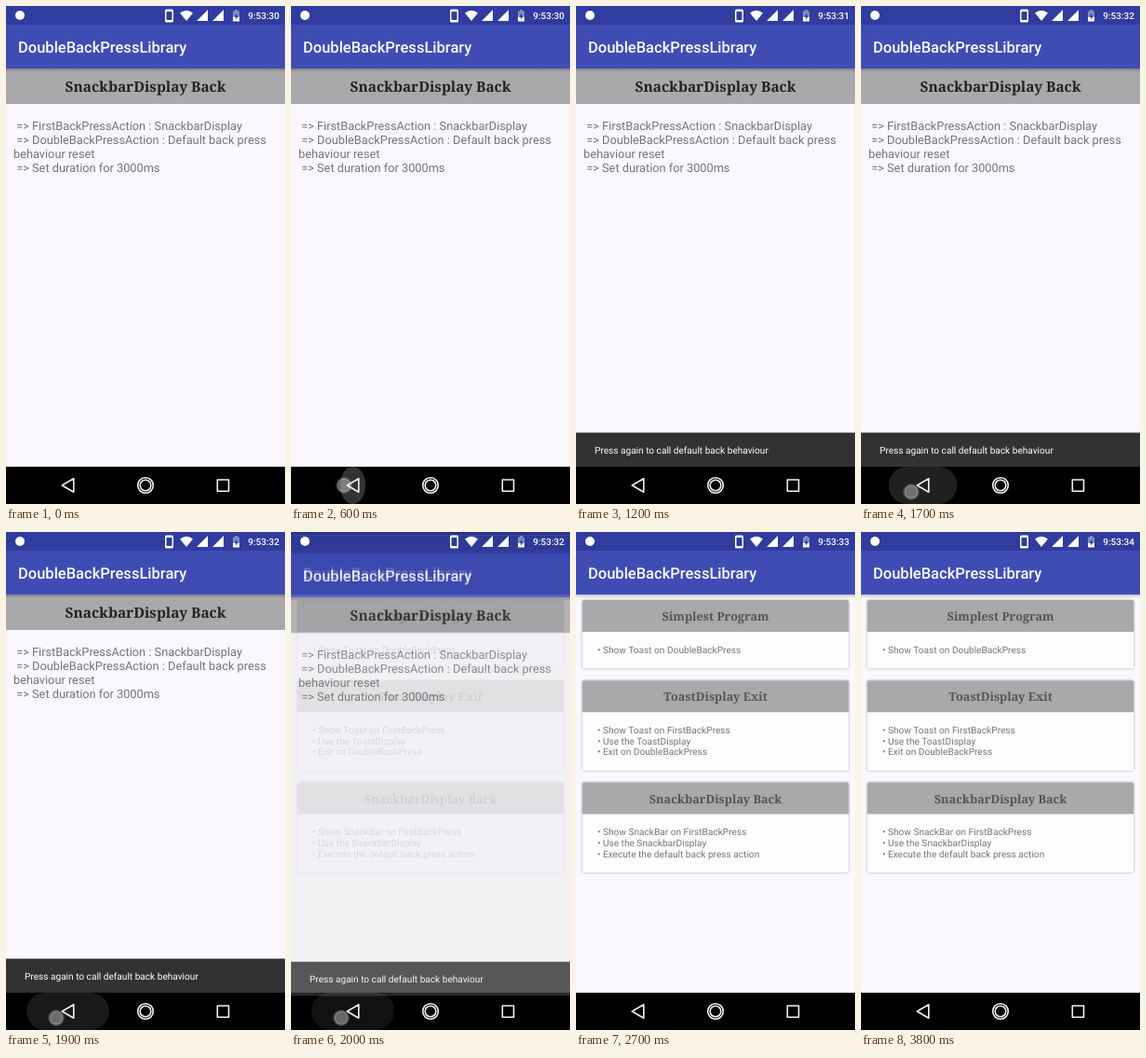
An HTML page that plays this animation: 300 px wide and 534 px high, repeating every 4000 ms.

```html
<!DOCTYPE html>
<html lang="en">
<head>
<meta charset="utf-8">
<title>Double back press demo</title>
<style>
  html, body { margin: 0; width: 100%; height: 100%; overflow: hidden; background: #000; }
  svg { display: block; width: 300px; height: 534px; font-family: Roboto, sans-serif; text-rendering: geometricPrecision; }
  .title { font: 500 16.5px Roboto, sans-serif; fill: #fff; }
  .serif { font-family: "Noto Serif", serif; font-weight: 700; text-anchor: middle; }
  .body { font-size: 12.78px; fill: #757478; }
  .item { font-size: 10.13px; fill: #77767a; }
  .card { filter: drop-shadow(0 .8px 1.2px rgba(0, 0, 0, .34)); }
  .nav { fill: none; stroke: #f2f2f2; stroke-width: 1.6; stroke-linejoin: round; }
</style>
</head>
<body>
<svg viewBox="0 0 300 534">
  <defs>
    <linearGradient id="shade" x2="0" y2="1">
      <stop stop-opacity=".22"/>
      <stop offset="1" stop-opacity="0"/>
    </linearGradient>
    <clipPath id="window"><path d="M0 0h300v494H0z"/></clipPath>
    <g id="appBar">
      <rect y="67" width="300" height="4" fill="url(#shade)"/>
      <rect width="300" height="67" fill="#3f4cb4"/>
      <rect width="300" height="20" fill="#303c9e"/>
      <text class="title" x="13" y="50">DoubleBackPressLibrary</text>
    </g>
  </defs>

  <rect width="300" height="534"/>
  <g id="home">
    <rect width="300" height="494" fill="#faf8fc"/>
    <g id="cards"></g>
    <use href="#appBar"/>
  </g>

  <g id="detail">
    <rect width="300" height="494" fill="#faf8fc"/>
    <rect y="67" width="300" height="38" fill="#a9a8aa"/>
    <text class="serif" x="150" y="92" font-size="15.4" fill="#222">SnackbarDisplay Back</text>
    <g class="body">
      <text x="11.2" y="133">=&gt; FirstBackPressAction : SnackbarDisplay</text>
      <text x="11.2" y="148">=&gt; DoubleBackPressAction : Default back press</text>
      <text x="8" y="163">behaviour reset</text>
      <text x="11.2" y="178">=&gt; Set duration for 3000ms</text>
    </g>
    <use href="#appBar"/>
    <g clip-path="url(#window)">
      <g id="snackbar">
        <rect y="457.5" width="300" height="37" fill="#323134"/>
        <text id="message" x="20" y="479.5" font-size="10.1" fill="#fff">Press again to call default back behaviour</text>
      </g>
    </g>
    <rect y="494" width="300" height="40"/>
  </g>

  <g fill="#fff">
    <circle cx="15" cy="10" r="5"/>
    <path fill-rule="evenodd" d="M172.500 3.500h6q1.500 0 1.500 1.500v11q0 1.500-1.500 1.500h-6q-1.500 0-1.500-1.500v-11q0-1.500 1.500-1.500zM172.500 6v9h6v-9z"/>
    <path d="M187 7.500q7-5.500 14 0l-7 8.500z"/>
    <path d="M217 4v12h-12zM234 4v12h-12z"/>
    <path d="M244 5.500h2v-1.500h3v1.500h2v6h-7z" opacity=".4"/>
    <path d="M244 11.500h7v5h-7z"/>
    <path d="M248.200 7.500l-2.700 4.500h1.700v3l2.600-4.500h-1.600z" fill="#303c9e"/>
    <text id="clock" x="294" y="13.800" text-anchor="end" font-size="10" font-weight="500"></text>
  </g>

  <rect id="ripple" y="494" height="40" rx="20" fill="#fff"/>
  <circle id="finger" r="7.5" fill="#fff" fill-opacity=".36" stroke="#fff" stroke-opacity=".16" stroke-width="3"/>
  <g class="nav">
    <path d="M60.300 514l12.500-7.300v14.600z"/>
    <circle cx="150" cy="514" r="8.300"/>
    <circle cx="150" cy="514" r="5.800"/>
    <path d="M227.300 508h12.200v12.200h-12.200z"/>
  </g>
</svg>

<script>
const LOOP = 4000, STEP = 100;
const $ = id => document.getElementById(id);
const clamp = v => Math.min(1, Math.max(0, v));
const progress = (t, start, duration) => clamp((t - start) / duration);

function setAttrs(id, attrs) {
  for (const name in attrs) $(id).setAttribute(name, attrs[name]);
}

// Material "fast out, slow in": cubic-bezier(.4, 0, .2, 1)
function fastOutSlowIn(x) {
  let lo = 0, hi = 1, u = x;
  for (let i = 0; i < 20; i++) {
    u = (lo + hi) / 2;
    const at = 1.2 * u * (1 - u) ** 2 + .6 * u * u * (1 - u) + u ** 3;
    if (at < x) lo = u; else hi = u;
  }
  return 3 * u * u - 2 * u ** 3;
}

const cards = [
  [73, 'Simplest Program', 'Show Toast on DoubleBackPress'],
  [159.2, 'ToastDisplay Exit', 'Show Toast on FirstBackPress', 'Use the ToastDisplay', 'Exit on DoubleBackPress'],
  [268.5, 'SnackbarDisplay Back', 'Show SnackBar on FirstBackPress', 'Use the SnackbarDisplay', 'Execute the default back press action'],
];
$('cards').innerHTML = cards.map(([y, title, ...items]) => `
  <g class="card">
    <rect x="6.7" y="${y}" width="286.6" height="${62 + 11.6 * items.length}" rx="2" fill="#fdfcfe"/>
    <path d="M6.700 ${y + 34}v-32q0-2 2-2h282.600q2 0 2 2v32z" fill="#a9a8aa"/>
  </g>
  <text class="serif" x="150" y="${y + 22}" font-size="12.7" fill="#555457">${title}</text>
  ${items.map((item, i) => `<text class="item" x="23" y="${y + 56.8 + 11.7 * i}">• ${item}</text>`).join('')}`).join('');

const presses = [
  { down: 560, up: 700, fade: 450, glow: .2, x: 57, y: 514, lift: 700 },
  { down: 1560, up: 1800, fade: 450, glow: .125, x: 54, y: 521, lift: 2000 },
];

function drawPress(t) {
  const p = presses[t < 1500 ? 0 : 1];
  const width = 89 * (1 - (1 - progress(t, p.down, 240)) ** 2);
  setAttrs('ripple', { x: 66.5 - width / 2, width, opacity: p.glow * (1 - progress(t, p.up, p.fade)) });
  setAttrs('finger', { cx: p.x, cy: p.y, opacity: t < p.down ? 0 : 1 - progress(t, p.lift, 200) });
}

function draw(t) {
  $('clock').textContent = '9:53:' + (30 + Math.floor((t + 300) / 1000));

  const slide = fastOutSlowIn(progress(t, 717, 250));
  setAttrs('snackbar', { transform: `translate(0 ${37 * (1 - slide)})` });
  setAttrs('message', { opacity: progress(t, 800, 180) });

  // The closing screen drops by 8% of the height and fades near the end
  const leave = progress(t, 1868, 250);
  setAttrs('detail', {
    transform: `translate(0 ${42.7 * leave ** 4})`,
    opacity: 1 - progress(t, 1966, 150),
  });
  setAttrs('home', { opacity: .7 + .3 * leave });

  drawPress(t);
}

function tick() {
  draw(Math.floor(performance.now() % LOOP / STEP) * STEP);
  requestAnimationFrame(tick);
}
tick();
</script>
</body>
</html>
```
